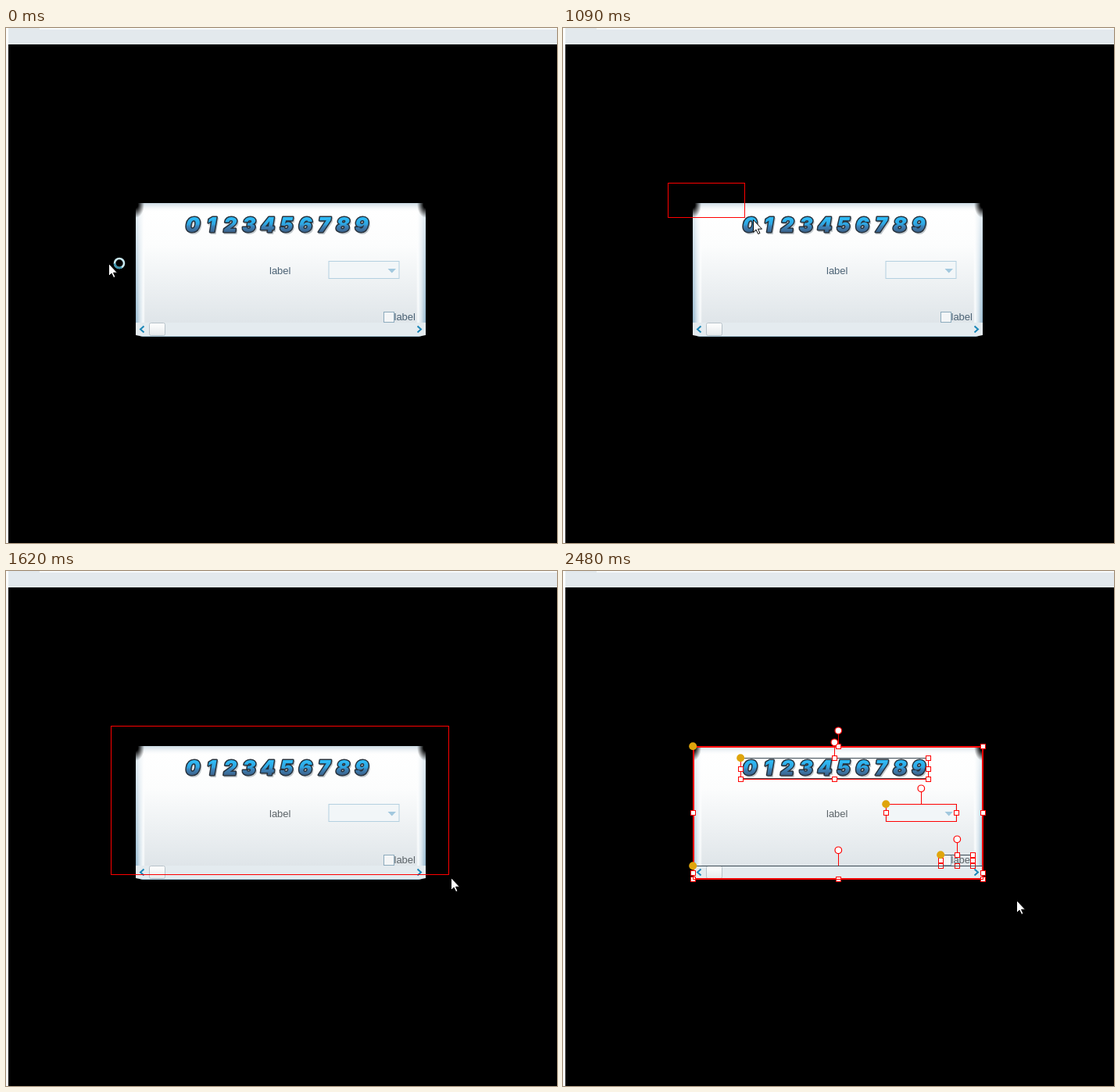
Recreate the animation shown at these times as an HTML page. Size 705 px wide and 659 px high, loop 3.18 s.

```html
<!DOCTYPE html>
<html lang="en">
<head>
<meta charset="utf-8">
<title>Marquee selection</title>
<style>
  html, body { margin: 0; width: 100%; height: 100%; overflow: hidden; background: #000; }
  svg { display: block; width: 705px; height: 659px; }
  .label { font: 13px "Liberation Sans", Arial, sans-serif; fill: #4b6274; }
  .digits { font: italic 900 26px Inter, "Liberation Sans", sans-serif; text-anchor: middle; }
  .line { fill: none; stroke: #f00; shape-rendering: crispEdges; }
  .dark { stroke: #3c4a54; }
  .grip { fill: #fff; stroke: #f00; shape-rendering: crispEdges; }
  .knob { fill: #fff; stroke: #f00; stroke-width: 1.2; }
  .pivot { fill: #dfa50c; }
</style>
</head>
<body>
<svg viewBox="0 0 705 659">
  <defs>
    <linearGradient id="body" x2="0" y2="1">
      <stop offset=".06" stop-color="#fff"/><stop offset=".35" stop-color="#fcfdfd"/>
      <stop offset="1" stop-color="#dfe5e9"/>
    </linearGradient>
    <linearGradient id="bodyHot" x2="0" y2="1">
      <stop offset=".06" stop-color="#f8fbfd"/><stop offset=".35" stop-color="#ecf3f7"/>
      <stop offset="1" stop-color="#cddde6"/>
    </linearGradient>
    <linearGradient id="top" x2="0" y2="1">
      <stop stop-color="#c9d8e2"/><stop offset="1" stop-color="#fff" stop-opacity="0"/>
    </linearGradient>
    <linearGradient id="topHot" x2="0" y2="1">
      <stop stop-color="#9fc1d7"/><stop offset="1" stop-color="#f8fbfd" stop-opacity="0"/>
    </linearGradient>
    <linearGradient id="side">
      <stop stop-color="#94b8cf"/><stop offset=".45" stop-color="#d5e3ec"/>
      <stop offset=".8" stop-color="#f7fafb"/><stop offset="1" stop-color="#fff" stop-opacity="0"/>
    </linearGradient>
    <linearGradient id="fade" x2="0" y2="1">
      <stop stop-color="#fff" stop-opacity=".75"/><stop offset="1" stop-color="#fff" stop-opacity="0"/>
    </linearGradient>
    <radialGradient id="corner">
      <stop offset=".25" stop-color="#000"/><stop offset="1" stop-color="#000" stop-opacity="0"/>
    </radialGradient>
    <linearGradient id="ink" gradientUnits="userSpaceOnUse" x1="0" x2="0" y1="242" y2="262">
      <stop stop-color="#2fbdf8"/><stop offset=".45" stop-color="#2ea6e2"/>
      <stop offset=".6" stop-color="#3c82b8"/><stop offset="1" stop-color="#3b5f86"/>
    </linearGradient>
    <linearGradient id="thumb" x2="0" y2="1">
      <stop stop-color="#fff"/><stop offset="1" stop-color="#e6eaec"/>
    </linearGradient>
    <clipPath id="panelClip"><path d="M166 224H537V393L527 395H176L166 393Z"/></clipPath>
  </defs>

  <rect width="705" height="659"/>
  <rect width="705" height="21" fill="#e3e9ed"/>
  <rect x="43" width="662" height="2" fill="#f8fbfc"/>
  <rect width="3" height="659" fill="#fcfdfd"/>

  <g clip-path="url(#panelClip)">
    <rect x="166" y="224" width="371" height="153" fill="url(#body)"/>
    <rect id="hot" x="166" y="224" width="371" height="153" fill="url(#bodyHot)"/>
    <g id="edge">
      <rect x="166" y="224" width="12" height="153" fill="url(#side)"/>
      <rect x="525" y="224" width="12" height="153" fill="url(#side)" transform="rotate(180 531 300.5)"/>
      <rect x="166" y="224" width="11" height="153" fill="url(#fade)"/>
      <rect x="526" y="224" width="11" height="153" fill="url(#fade)"/>
    </g>
    <rect id="lip" x="166" y="224" width="371" height="12" fill="url(#top)"/>
    <ellipse cx="166" cy="226" rx="11" ry="17" fill="url(#corner)"/>
    <ellipse cx="537" cy="226" rx="11" ry="17" fill="url(#corner)"/>
    <rect x="166" y="377" width="371" height="18" fill="#e4ebef"/>
    <rect x="166" y="394" width="371" height="1" fill="#a9c9da"/>
    <rect x="183.5" y="377.5" width="20" height="16" rx="2" fill="url(#thumb)" stroke="#b7c2c9"/>
    <path d="M176.500 381.500L172 385.500L176.500 389.500M526.500 381.500L531 385.500L526.500 389.500" fill="none" stroke="#1b87b8" stroke-width="2"/>
  </g>

  <g id="digits" class="digits"></g>
  <text class="label" x="337" y="315">label</text>
  <rect x="413" y="298.500" width="90" height="22" fill="#f2f6f8" stroke="#b4d0e0"/>
  <path d="M488.500 308H499L493.750 313.500Z" fill="#a2c8de"/>
  <rect x="483.500" y="363.500" width="13" height="13" fill="#f4f6f7" stroke="#8dabbd"/>
  <text class="label" x="496.500" y="374">label</text>

  <g id="handles"></g>
  <g id="marquee">
    <rect id="box" class="line" x="134.500" y="198.500"/>
    <path id="under" class="line dark"/>
  </g>

  <g id="pointer">
    <path d="M.5 .5V16.500L4 13L6.700 18.500L9 17.500L6.500 12.200H11.500Z" fill="#fff" stroke="#000"/>
    <g id="busy" fill="none" stroke-width="2.600">
      <circle id="ring" cx="14" r="6"/>
      <circle id="arc" cx="14" r="6" stroke-dasharray="12 25.700"/>
    </g>
  </g>
</svg>
<script>
const $ = id => document.getElementById(id);
const show = (id, on) => $(id).setAttribute('visibility', on ? 'visible' : 'hidden');

function add(parent, tag, attrs, text = '') {
  const el = document.createElementNS('http://www.w3.org/2000/svg', tag);
  for (const k in attrs) el.setAttribute(k, attrs[k]);
  el.textContent = text;
  parent.append(el);
}

// Number strip: shadow, outline, fill
for (let i = 0; i < 10; i++) {
  const x = 239 + 24 * i;
  add($('digits'), 'text', { x: x + 1.5, y: 263, fill: '#8b979f', stroke: '#8b979f', 'stroke-width': 2, opacity: .5 }, i);
  add($('digits'), 'text', { x, y: 261, fill: 'url(#ink)', stroke: '#27323d', 'stroke-width': 3, 'stroke-linejoin': 'round', 'paint-order': 'stroke' }, i);
}

// Grips are named by compass direction
function select(l, t, r, b, knobY, grips, dark) {
  const g = $('handles'), cx = Math.round((l + r) / 2), cy = Math.round((t + b) / 2);
  add(g, 'rect', { class: 'line', x: l + .5, y: t + .5, width: r - l, height: b - t });
  if (dark) add(g, 'path', { class: 'line dark', d: dark });
  add(g, 'path', { class: 'line', d: `M${cx + .5} ${knobY}V${t}` });
  for (const dir of grips.split(' ')) {
    const x = dir.includes('w') ? l : dir.includes('e') ? r : cx;
    const y = dir.includes('n') ? t : dir.includes('s') ? b : cy;
    add(g, 'rect', { class: 'grip', x: x - 2.5, y: y - 2.5, width: 6, height: 6 });
  }
  add(g, 'circle', { class: 'knob', cx: cx + .3, cy: knobY + .3, r: 4.3 });
  add(g, 'circle', { class: 'pivot', cx: l + .2, cy: t + .2, r: 5 });
}
add($('handles'), 'rect', { class: 'line', x: 167, y: 225, width: 370, height: 169, 'stroke-width': 2 });
select(166, 224, 537, 394, 204, 'n ne w e sw s se');
select(227, 239, 467, 266, 219, 'n ne w e sw s se', 'M228 239.500H467M228 265.500H467M347.500 224V239');
select(413, 298, 503, 320, 278, 'w e');
select(483, 363, 524, 377, 343, 'n ne w e sw s se', 'M480 363.500H524');
select(166, 377, 537, 394, 357, 'w e', 'M167 377.500H537');

// time, pointer x, y, marquee right, bottom
const poses = [
  [0, 131, 301], [230, 131, 291], [310, 132, 264], [390, 134, 236],
  [460, 135, 214], [540, 135, 206], [610, 135, 201], [690, 134, 198],
  [1010, 168, 211, 160, 208], [1090, 243, 245, 232, 242],
  [1160, 284, 264, 275, 261], [1240, 333, 287, 327, 285],
  [1340, 396, 314, 394, 313], [1390, 450, 340, 442, 336],
  [1470, 523, 373, 510, 366], [1550, 553, 384, 547, 380],
  [1620, 569, 392, 566, 388], [1700, 574, 401, 572, 398],
  [1780, 577, 409, 576, 407], [1850, 579, 415, 578, 414],
  [1930, 580, 420, 579, 419], [2010, 581, 424, 580, 423],
  [2240, 581, 423, 580, 422], [2310, 580, 421, 580, 422]
];
const LOOP = 3180, start = performance.now();

function draw(t) {
  const i = poses.findLastIndex(p => p[0] <= t);
  const [, x, y, right, bottom] = poses[i];
  const hot = t >= 1240 && t < 1550, done = t >= 2480;

  $('pointer').setAttribute('transform', `translate(${x} ${y})`);
  show('busy', t < 840);
  $('ring').setAttribute('stroke', t < 230 ? '#c9e9f1' : '#d6fbee');
  $('arc').setAttribute('stroke', t < 230 ? '#3a93ac' : '#3fb584');
  $('arc').setAttribute('transform', `rotate(${60 + i * 50} 14 0)`);

  show('marquee', right && !done);
  if (right) {
    $('box').setAttribute('width', right - 134);
    $('box').setAttribute('height', bottom - 198);
    $('under').setAttribute('d', hot ? `M166 ${bottom + .5}H${right}` : '');
  }
  show('hot', hot);
  $('lip').setAttribute('fill', hot ? 'url(#topHot)' : 'url(#top)');
  const labels = document.querySelectorAll('.label');
  labels[0].style.fill = hot ? '#18a336' : t < 1550 ? '' : '#5c6468';
  labels[1].style.fill = t < 1550 ? '' : '#5c6468';
  show('handles', done);
}

function tick(now) {
  draw(Math.max(0, now - start) % LOOP);
  requestAnimationFrame(tick);
}
draw(0);
requestAnimationFrame(tick);
</script>
</body>
</html>
```
